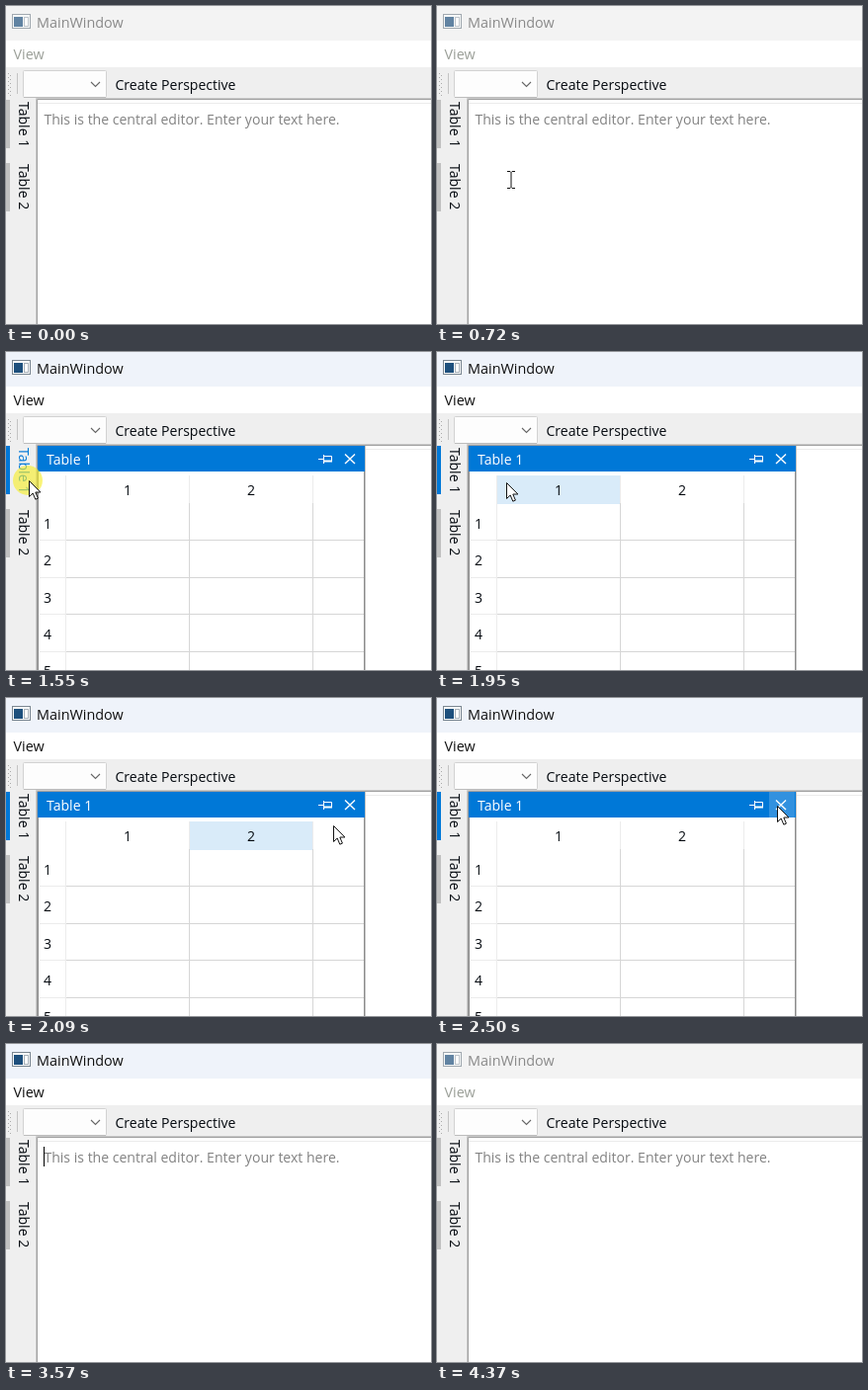
An HTML page for the animation above (4.44 s loop, 430 px wide and 322 px high).

```html
<!DOCTYPE html>
<html lang="en">
<head>
<meta charset="utf-8">
<title>Auto-hide dock panel</title>
<style>
html, body { margin: 0; width: 100%; height: 100%; overflow: hidden; background: #fff; }
svg { display: block; width: 430px; height: 322px; }
text { font: 14.07px "Open Sans", "Noto Sans", sans-serif; fill: #050a10; }
.bar { font-size: 14.4px; }
.line { fill: none; stroke: #d6d6d6; }
.faint { stroke: #ececec; }

/* Every state is held until the next one; 1% of the loop is 44.4 ms. */
.live { animation: var(--k) 4440ms step-end infinite; }

@keyframes titleBg { 0%, 96.84% { fill: #f3f3f3 } 33.33% { fill: #eff3fa } }
@keyframes titleInk {
  0%, 96.84% { fill: #8a8a8a }
  33.33% { fill: #111 }
  95.49% { fill: #555 }
}
@keyframes menuInk { 0%, 96.84% { fill: #9b9f98 } 33.33% { fill: #111 } }
@keyframes icon { 0%, 96.84% { opacity: .68 } 33.33% { opacity: 1 } }
@keyframes marker { 0%, 69.81% { fill: #c1c1c1 } 21.17% { fill: #0078d7 } }
@keyframes tabInk { 0%, 43.91% { fill: #050a10 } 21.17% { fill: #0078d7 } }
@keyframes panel { 0%, 69.81% { opacity: 0 } 34.9% { opacity: 1 } }
@keyframes head1 { 0%, 45.49% { opacity: 0 } 43.91% { opacity: 1 } }
@keyframes head2 { 0%, 48.64% { opacity: 0 } 45.49% { opacity: 1 } }
@keyframes close {
  0% { fill: #0078d7 }
  50% { fill: #3291df }
  65.31%, 100% { fill: #5aa8e6 }
}
@keyframes click {
  0%, 38.06% { opacity: 0; transform: translate(22px, 130px) }
  33.33%, 34.9% { opacity: .62; transform: translate(22px, 130px) }
  36.48% { opacity: .3; transform: translate(22px, 130px) }
  65.31% { opacity: .62; transform: translate(344px, 109px) }
  69.81% { opacity: .3; transform: translate(344px, 109px) }
  71.39%, 100% { opacity: 0; transform: translate(344px, 109px) }
}
@keyframes caret { 0%, 92.34% { opacity: 0 } 80.4% { opacity: 1 } }
@keyframes beam {
  0%, 21.17%, 80.4%, 100% { transform: translate(-50px, 0) }
  8.33% { transform: translate(315px, 300px) }
  9.9% { transform: translate(268px, 276px) }
  11.48% { transform: translate(214px, 248px) }
  13.06% { transform: translate(160px, 219px) }
  14.63% { transform: translate(113px, 195px) }
  16.21% { transform: translate(75px, 176px) }
  17.79% { transform: translate(49px, 165px) }
  19.59% { transform: translate(36px, 160px) }
  71.39% { transform: translate(344px, 111px) }
  77.25% { transform: translate(372px, 160px) }
  78.82% { transform: translate(424px, 243px) }
}
@keyframes arrow {
  0%, 71.39%, 100% { transform: translate(-50px, 0) }
  21.17% { transform: translate(28px, 143px) }
  22.74% { transform: translate(26px, 137px) }
  24.32% { transform: translate(25px, 133px) }
  25.67% { transform: translate(24px, 131px) }
  27.25% { transform: translate(23px, 130px) }
  43.91% { transform: translate(70px, 132px) }
  45.49% { transform: translate(215px, 133px) }
  47.07% { transform: translate(331px, 129px) }
  48.64% { transform: translate(338px, 124px) }
  50% { transform: translate(341px, 119px) }
  51.57% { transform: translate(343px, 115px) }
  53.15% { transform: translate(344px, 112px) }
  54.72% { transform: translate(344px, 111px) }
  56.3% { transform: translate(344px, 109px) }
}
</style>
</head>
<body>
<svg viewBox="0 0 430 322">
  <rect width="430" height="322" fill="#fff"/>

  <!-- title and menu bars -->
  <rect class="live" style="--k:titleBg" width="430" height="35" fill="#f3f3f3"/>
  <g class="live" style="--k:icon">
    <rect x="6.5" y="8.5" width="18" height="14" fill="#f7f9fa" stroke="#7b8791"/>
    <rect x="8" y="11" width="9" height="10" fill="#1d4f7c"/>
    <rect x="18.5" y="11.5" width="4" height="9" fill="#fff" stroke="#a9b2ba"/>
  </g>
  <text class="bar live" style="--k:titleInk" x="31" y="22">MainWindow</text>
  <text class="bar live" style="--k:menuInk" x="7.5" y="54">View</text>

  <!-- toolbar -->
  <rect y="62" width="430" height="33" fill="#efefef"/>
  <path d="M2.5 68V91M4.5 70V91" stroke="#ababab" stroke-dasharray="1 3"/>
  <path d="M11.5 68V89" stroke="#c4c4c4"/>
  <rect x="17.5" y="65.5" width="84" height="27" rx="1" fill="#fdfdfd" stroke="#d2d2d2"/>
  <path d="M18 92.5H101" stroke="#bcbcbc"/>
  <path d="M86 77L90.5 81.5 95 77" fill="none" stroke="#666" stroke-width="1.1"/>
  <text x="110.5" y="85">Create Perspective</text>

  <!-- side bar -->
  <rect y="95" width="31" height="227" fill="#efefef"/>
  <rect class="live" style="--k:marker" y="95" width="4" height="49" fill="#c1c1c1"/>
  <rect y="159" width="4" height="49" fill="#c1c1c1"/>
  <text class="live" style="--k:tabInk" transform="translate(13 97) rotate(90)">Table 1</text>
  <text transform="translate(13 160) rotate(90)">Table 2</text>

  <!-- editor -->
  <path d="M30.5 322V93.5H430" fill="none" stroke="#c9c9c9"/>
  <path d="M31.5 322V94.5H430" fill="none" stroke="#a0a0a0"/>
  <path d="M32 98.5H430" stroke="#ebebeb"/>
  <text x="38.4" y="120" style="fill:#828282">This is the central editor. Enter your text here.</text>
  <rect class="live" style="--k:caret" x="38" y="104" width="1" height="20" opacity="0"/>

  <!-- sliding table panel -->
  <g class="live" style="--k:panel" opacity="0">
    <rect x="32" y="95" width="331" height="227" fill="#fff"/>
    <rect class="live" style="--k:head1" x="61" y="125" width="124" height="29" fill="#d9ebf9"/>
    <rect class="live" style="--k:head2" x="186" y="125" width="124" height="29" fill="#d9ebf9"/>
    <path class="line faint" d="M60.5 125V322M185.5 125V153M310.5 125V153M34 190.5H60M34 228.5H60M34 265.5H60M34 303.5H60"/>
    <path class="line" d="M185.5 153V322M310.5 153V322M61 190.5H362M61 228.5H362M61 265.5H362M61 303.5H362"/>
    <path d="M32.5 121V322M362.5 121V322" stroke="#8c8c8c"/>
    <path d="M363.5 95V322" stroke="#c4c4c4"/>
    <g text-anchor="middle">
      <text x="123" y="145">1</text>
      <text x="248" y="145">2</text>
    </g>
    <text x="38" y="179">1</text>
    <text x="38" y="216">2</text>
    <text x="38" y="254">3</text>
    <text x="38" y="291">4</text>
    <text x="38" y="328">5</text>

    <rect x="32" y="95" width="331" height="26" fill="#0078d7"/>
    <rect class="live" style="--k:close" x="336" y="95" width="26" height="26" fill="#0078d7"/>
    <text x="41" y="114" style="fill:#fff">Table 1</text>
    <g fill="none" stroke="#fff">
      <path d="M316 108.5H321M321.5 104V113M322 105.5H329.5V111"/>
      <path d="M322 110.5H330" stroke-width="2"/>
      <path d="M343 103.5L353 113M353 103.5L343 113" stroke-width="1.4"/>
    </g>
  </g>

  <!-- pointer -->
  <circle class="live" style="--k:click" r="15" fill="#f8ee28" opacity="0"/>
  <path class="live" style="--k:beam" d="M-4 -8.5H-1L0 -7.5 1 -8.5H4M0 -7.5V7.5M-4 8.5H-1L0 7.5 1 8.5H4" fill="none" stroke="#111"/>
  <path class="live" style="--k:arrow" d="M.5 .5V16.5L4.2 13 6.8 19.2 9.4 18.1 6.8 12H11.9Z" fill="#fff" stroke="#111"/>
</svg>
</body>
</html>
```
